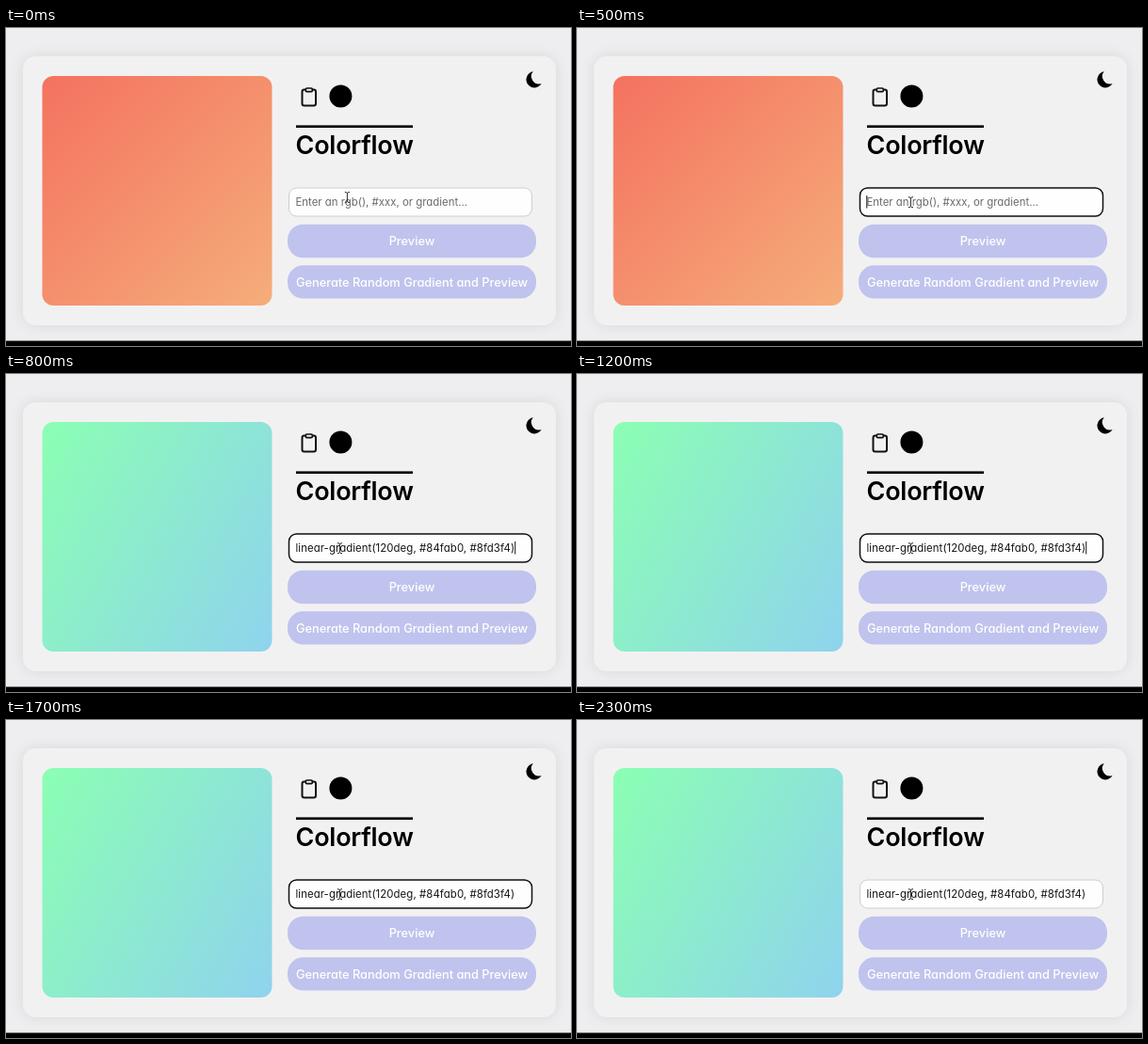
Animation of 600 by 338 pixels, one loop 2.4 s. Source, as an HTML page:

```html
<!DOCTYPE html>
<html lang="en">
<head>
<meta charset="utf-8">
<title>Colorflow</title>
<style>
  html, body { margin: 0; width: 100%; height: 100%; overflow: hidden; background: #eeedef; }
  svg { display: block; width: 100vw; height: 100vh; }
  text {
    font-family: Inter, Roboto, sans-serif;
    font-feature-settings: "cv11";
    font-optical-sizing: none;
    white-space: pre;
  }
  .card { fill: #f2f1f2; filter: drop-shadow(0 0 7px rgba(0, 0, 0, .09)); }
  .title { font-size: 27px; font-weight: 600; letter-spacing: -.25px; }
  .field { font-size: 11.4px; }
  .button rect { fill: #c0c3ed; }
  .button text { fill: #fff; font-size: 12.8px; font-weight: 500; text-anchor: middle; }
  .line { fill: none; stroke: #111; }
</style>
</head>
<body>
<svg viewBox="0 0 600 338">
  <defs>
    <linearGradient id="warm" gradientUnits="userSpaceOnUse" x1="38.5" y1="51" x2="282.5" y2="295">
      <stop stop-color="#f4725f"/><stop offset="1" stop-color="#f5ad7b"/>
    </linearGradient>
    <linearGradient id="cool" gradientUnits="userSpaceOnUse" x1="16.2" y1="89.7" x2="304.8" y2="256.3">
      <stop stop-color="#8bffb3"/><stop offset="1" stop-color="#8fd3ee"/>
    </linearGradient>
  </defs>

  <rect width="600" height="338" fill="#eeedef"/>
  <rect class="card" x="18" y="30" width="566" height="286" rx="14"/>
  <rect y="332.5" width="600" height="5.5"/>
  <rect id="swatch" x="38.5" y="51" width="244" height="244" rx="12"/>

  <g class="line" stroke-width="2" stroke-linejoin="round">
    <rect x="314.5" y="65.5" width="14.5" height="17" rx="2.2"/>
    <rect x="318.3" y="64" width="7" height="3.6" rx="1.2" fill="#f2f1f2" stroke-width="1.7"/>
  </g>
  <circle cx="355.4" cy="72.4" r="12"/>
  <path d="M559.8 46.3A8.6 8.6 0 1 0 568.6 59A8 8 0 0 1 559.8 46.3z"/>

  <rect x="308" y="103.4" width="124" height="2.6"/>
  <text class="title" x="307.5" y="134">Colorflow</text>

  <rect id="box" x="300.5" y="170" width="258" height="30" rx="8" fill="#fefefe"/>
  <text id="hint" class="field" x="307.5" y="188.5" fill="#6b6b6b">Enter an rgb(), #xxx, or gradient...</text>
  <text id="value" class="field" x="307.5" y="188.5" fill="#151515" letter-spacing=".07">linear-gradient(120deg, #84fab0, #8fd3f4)</text>
  <path id="caret" class="line" d="M0 178V191.5"/>

  <g class="button">
    <rect x="299" y="208.7" width="264" height="35.6" rx="16.5"/>
    <text x="431" y="231">Preview</text>
    <rect x="299" y="252.3" width="264" height="35.2" rx="16.5"/>
    <text x="431" y="274.7">Generate Random Gradient and Preview</text>
  </g>

  <path id="mouse" class="line" stroke-width=".9" d="M-2.6 -5.5Q0 -5.5 0 -4.3Q0 -5.5 2.6 -5.5M0 -4.3V4.3M-2.6 5.5Q0 5.5 0 4.3Q0 5.5 2.6 5.5"/>
</svg>
<script>
  const LOOP = 2400, STEP = 100, BLINK = 500;
  const FOCUS = 200, PASTE = 800, BLUR = 2300;
  const [swatch, box, hint, value, caret, mouse] =
    ["swatch", "box", "hint", "value", "caret", "mouse"].map(id => document.getElementById(id));

  const show = (el, on) => el.setAttribute("visibility", on ? "visible" : "hidden");
  const mix = (a, b, k) => a + (b - a) * k;

  function draw(time) {
    const t = Math.floor(time % LOOP / STEP) * STEP;
    const focused = t >= FOCUS && t < BLUR;
    const pasted = t >= PASTE;

    swatch.setAttribute("fill", pasted ? "url(#cool)" : "url(#warm)");
    box.setAttribute("stroke", focused ? "#111" : "#cdcdcf");
    box.setAttribute("stroke-width", focused ? 1.5 : 1);
    show(hint, !pasted);
    show(value, pasted);

    // The blink restarts whenever the text changes
    const since = t - (pasted ? PASTE : FOCUS);
    show(caret, focused && since % (2 * BLINK) < BLINK);
    const x = pasted ? 308 + value.getComputedTextLength() : 307.8;
    caret.setAttribute("transform", `translate(${x} 0)`);

    const k = 1 - (1 - Math.min(t / FOCUS, 1)) ** 2;
    mouse.setAttribute("transform", `translate(${mix(362.4, 354.4, k)} ${mix(180, 185.2, k)})`);
  }

  const start = performance.now();
  function tick() {
    draw(performance.now() - start);
    requestAnimationFrame(tick);
  }
  tick();
</script>
</body>
</html>
```
